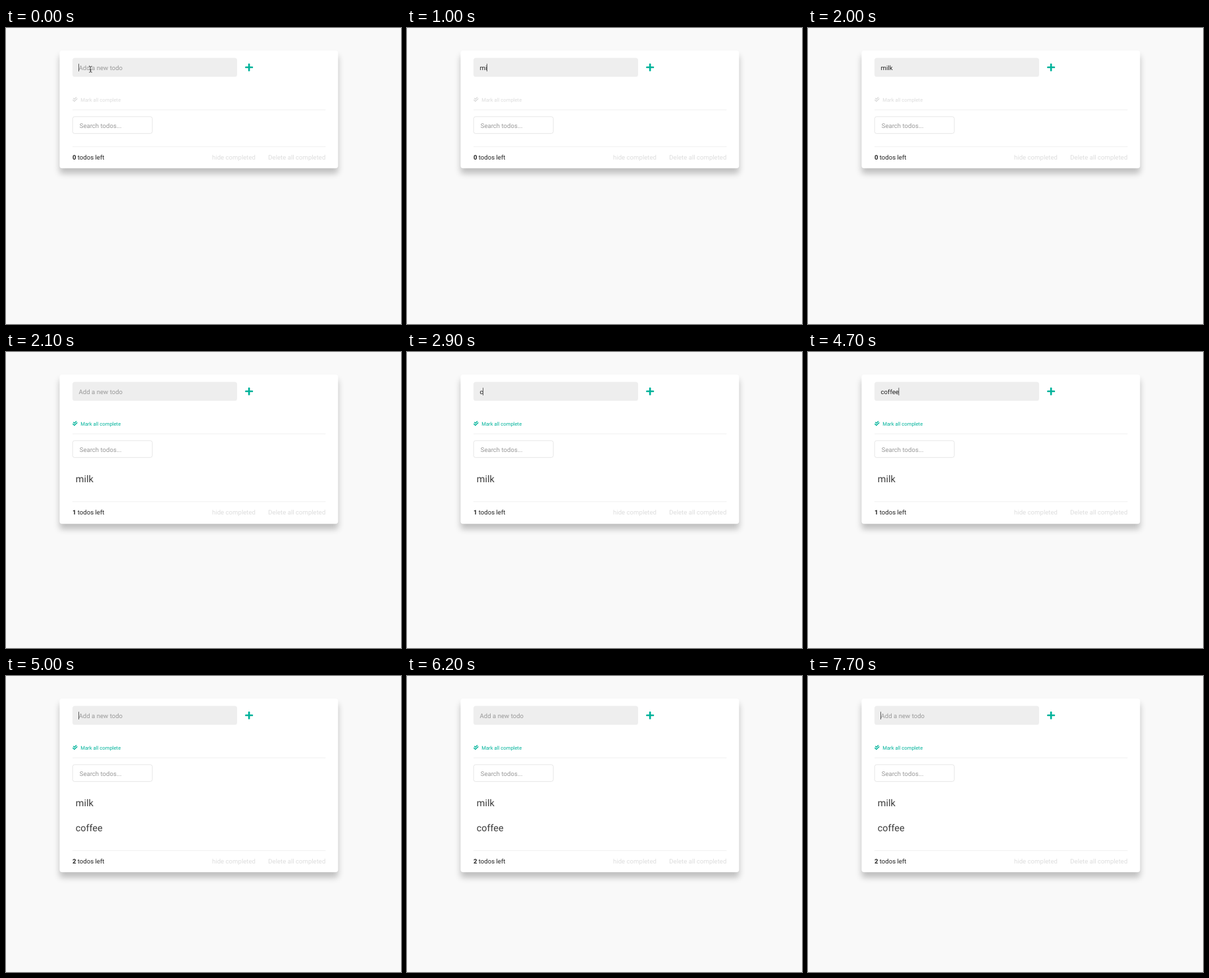
An HTML page that plays this animation: 600 by 450 pixels, repeating every 8000 ms.

```html
<!DOCTYPE html>
<html lang="en">
<head>
<meta charset="utf-8">
<title>Todo list</title>
<style>
  html, body { margin: 0; width: 100%; height: 100%; overflow: hidden; background: #f9f9f9; }
  #card {
    position: absolute; left: 0; top: 0; width: 422.8px;
    transform: translate(81.4px, 34.2px);
    background: #fff; border-radius: 4px;
    box-shadow: 0 8px 10px rgba(0, 0, 0, .24);
  }
  svg { position: absolute; left: 0; top: 0; }
  text { font: 9.6px Roboto, sans-serif; fill: #222; text-rendering: geometricPrecision; white-space: pre; }
  .hint { fill: #999; }
  .off { fill: #ddd; }
  .item { font-size: 14.4px; fill: #3c3c3c; }
  .line { stroke: #f1f1f1; stroke-width: 1; }
  #mark { color: #dcdcdc; }
  #mark.on { color: #00b39b; }
  #mark text { font-size: 7.68px; fill: currentColor; }
  #mark path { fill: none; stroke: currentColor; stroke-width: 1.35; stroke-linecap: round; stroke-linejoin: round; }
</style>
</head>
<body>
<div id="card"></div>
<svg width="600" height="450" viewBox="0 0 600 450">
  <rect x="101" y="45.5" width="250" height="28.8" rx="3.5" fill="#eee"/>
  <text id="hint" class="hint" x="110.6" y="63.7">Add a new todo</text>
  <text id="entry" x="110.6" y="63.7"></text>
  <rect id="caret" y="54.4" width=".6" height="11.6" fill="#000"/>
  <g fill="#00b39b">
    <rect x="363.3" y="58.4" width="11.8" height="2.7" rx=".9"/>
    <rect x="367.85" y="53.9" width="2.7" height="11.8" rx=".9"/>
  </g>

  <g id="mark">
    <path d="M102.5 106.9l1.4 1.4 2.8-2.8M101.7 109.5l2.2 2.1 4.1-4"/>
    <text x="113.2" y="111.5">Mark all complete</text>
  </g>
  <path class="line" d="M101 124.5H485.5"/>
  <rect x="101.2" y="134.8" width="121" height="25.6" rx="3" fill="#fff" stroke="#ddd" stroke-width=".7"/>
  <text class="hint" x="111.7" y="151.5">Search todos...</text>

  <text id="milk" class="item" x="105.8" y="198.2">milk</text>
  <text id="coffee" class="item" x="105.8" y="236">coffee</text>

  <g id="footer">
    <path class="line" d="M101 180.5H485.5"/>
    <text x="100.9" y="199.7"><tspan id="count" font-weight="700">0</tspan> todos left</text>
    <text class="off" x="313.1" y="199.7">hide completed</text>
    <text class="off" x="398.3" y="199.7">Delete all completed</text>
  </g>

  <path id="pointer" fill="none" stroke="#222" stroke-width=".8" stroke-linecap="round"
    d="M126.6 58.2q1.9 0 1.9 1.2q0-1.2 1.9-1.2M128.5 59.4v6.8M126.6 67.3q1.9 0 1.9-1.2q0 1.2 1.9 1.2M127.4 63.8h2.2"/>
</svg>
<script>
const LOOP = 8000;

// time, typed text, caret visible, number of todos
const steps = [
  [0, '', 1, 0], [200, '', 0, 0],
  [800, 'm', 1, 0], [1000, 'mi', 1, 0], [1300, 'mil', 1, 0], [1500, 'milk', 1, 0], [1900, 'milk', 0, 0],
  [2100, '', 0, 1], [2500, '', 1, 1],
  [2900, 'c', 1, 1], [3400, 'c', 0, 1], [3900, 'c', 1, 1],
  [4000, 'co', 1, 1], [4200, 'cof', 1, 1], [4400, 'coff', 1, 1], [4500, 'coffe', 1, 1], [4700, 'coffee', 1, 1],
  [5000, '', 1, 2], [5200, '', 0, 2], [5700, '', 1, 2], [6200, '', 0, 2],
  [6700, '', 1, 2], [7200, '', 0, 2], [7700, '', 1, 2]
];
const growth = [0, 47.1, 84.9];

const $ = id => document.getElementById(id);
const show = (id, visible) => $(id).setAttribute('visibility', visible ? 'visible' : 'hidden');

function draw(time) {
  const [, typed, caretOn, todos] = steps.findLast(step => step[0] <= time);
  $('entry').textContent = typed;
  show('hint', !typed);
  show('caret', caretOn);
  $('caret').setAttribute('x', 110.4 + (typed ? $('entry').getComputedTextLength() : 0));
  show('pointer', time < 800);
  show('milk', todos > 0);
  show('coffee', todos > 1);
  $('mark').classList.toggle('on', todos > 0);
  $('count').textContent = todos;
  $('footer').setAttribute('transform', `translate(0 ${growth[todos]})`);
  $('card').style.height = 179.4 + growth[todos] + 'px';
}

const start = performance.now();
function tick() {
  draw((performance.now() - start) % LOOP);
  requestAnimationFrame(tick);
}
tick();
</script>
</body>
</html>
```
